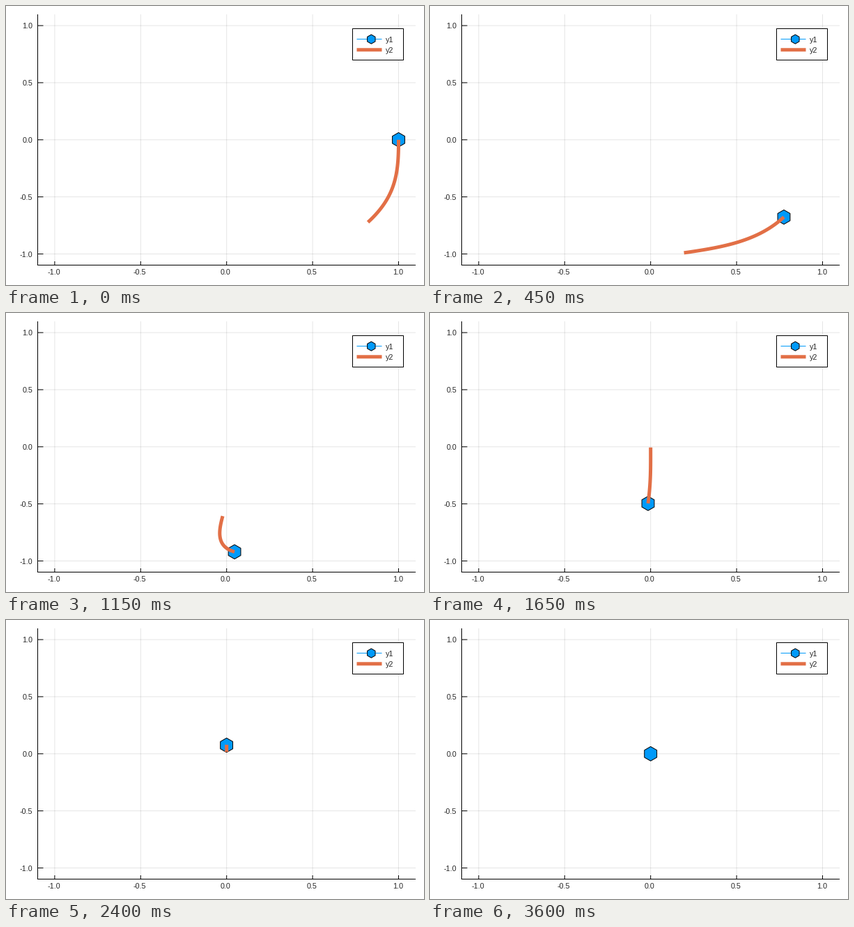
Recreate the animation shown at these times as a matplotlib script. Size 600 by 400 pixels, loop 4 s.

```python
import numpy as np
import matplotlib.pyplot as plt
from matplotlib.animation import FuncAnimation
from matplotlib.patches import Polygon, Rectangle

W, H, DPI = 600, 400, 100
FRAMES, STEP = 80, 50
HORIZON = 9          # steps that the path ahead covers
SETTLE = 50          # step from which the marker decays to rest
REST = 72            # step from which no path is left
BLUE, ORANGE = "#009afa", "#e26f46"
PX = 72 / DPI
TICKS = np.linspace(-1, 1, 5)

# key points: step, x, y
MARKER = [(0, 1, 0), (4, .965, -.33), (9, .775, -.677), (16, .37, -.91),
          (23, .046, -.92), (33, -.015, -.496), (40, -.003, -.111),
          (SETTLE, 0, .114)]
AHEAD = [(0, .822, -.722), (9, .194, -.99), (12, -.01, -.985),
         (16, -.055, -.86), (23, -.023, -.607), (33, 0, -.006),
         (40, .001, .08), (SETTLE, 0, 0)]
# step, direction of travel in degrees
HEADING = [(0, -90), (9, -126), (18, -168), (23, -203), (32, -280), (34, -270)]


def to_px(x, y):
    return 316.7 + 246.8 * x, 191.8 - 163.7 * y


def spline(keys, k):
    """Cubic Hermite curve through the keys."""
    keys = np.array(keys, float)
    t, p = keys[:, 0], keys[:, 1:]
    m = np.gradient(p, t, axis=0)
    i = min(np.searchsorted(t, k, side="right"), len(t) - 1) - 1
    h = t[i + 1] - t[i]
    s = (k - t[i]) / h
    return ((1 + 2 * s) * (1 - s) ** 2 * p[i] + s * (1 - s) ** 2 * h * m[i]
            + s * s * (3 - 2 * s) * p[i + 1] + s * s * (s - 1) * h * m[i + 1])


def heading(k):
    a = np.radians(np.interp(k, *zip(*HEADING)))
    return np.array([np.cos(a), np.sin(a)])


def path_ahead(k):
    """Curve that leaves the marker and ends along the later heading."""
    start, end = spline(MARKER, min(k, SETTLE)), spline(AHEAD, min(k, SETTLE))
    start = start * 0.7 ** max(0, k - SETTLE)
    reach = 0.38 * np.hypot(*(end - start))
    a = start + reach * heading(k)
    b = end - reach * heading(k + HORIZON)
    s = np.linspace(0, 1, 40)[:, None]
    return ((1 - s) ** 3 * start + 3 * s * (1 - s) ** 2 * a
            + 3 * s * s * (1 - s) * b + s ** 3 * end)


def hexagon(x, y, r):
    a = np.radians(np.arange(30, 390, 60))
    return np.column_stack([x + r * np.cos(a), y + r * np.sin(a)])


fig = plt.figure(figsize=(W / DPI, H / DPI), dpi=DPI, facecolor="white")
ax = fig.add_axes([0, 0, 1, 1])
ax.set_xlim(0, W)
ax.set_ylim(H, 0)
ax.axis("off")


def line(xs, ys, color="black", width=1, **kw):
    return ax.plot(xs, ys, color=color, lw=width * PX, snap=False,
                   solid_capstyle="butt", **kw)[0]


def label(x, y, text, ha):
    ax.text(x, y, text, ha=ha, va="baseline", fontsize=10.8 * PX,
            family="Liberation Sans", color="#262626", zorder=6)


def marker(x, y, r, z):
    return ax.add_patch(Polygon(hexagon(x, y, r), closed=True, fc=BLUE,
                                ec="black", lw=PX, zorder=z, snap=False))


for v in TICKS:
    x, y = to_px(v, v)
    line([x, x], [12, 371.5], alpha=0.1, zorder=1)
    line([45.5, 588], [y, y], alpha=0.1, zorder=1)
    line([x, x], [366, 371.5], zorder=2)
    line([45.5, 53.5], [y, y], zorder=2)
    label(x - 1.2, 385, f"{v:.1f}", "center")
    label(38, y + 4, f"{v:.1f}", "right")
line([45.5, 45.5], [12, 372], zorder=2)
line([45, 588], [371.5, 371.5], zorder=2)

ax.add_patch(Rectangle((497.5, 32.5), 73, 45, fc="white", ec="black",
                       lw=PX, zorder=5, snap=False))
line([503.5, 539.5], [47.5, 47.5], BLUE, 1, zorder=6)
marker(524.3, 47.6, 6.6, 7)
line([503.5, 539.5], [62.8, 62.8], ORANGE, 5, zorder=6)
label(545, 51.8, "y1", "left")
label(545, 66.8, "y2", "left")

ball = marker(0, 0, 10.3, 3)
trail = line([], [], ORANGE, 5, zorder=4, solid_joinstyle="bevel")


def update(k):
    path = path_ahead(k)
    ball.set_xy(hexagon(*to_px(*path[0]), 10.3))
    trail.set_data(*to_px(path[:, 0], path[:, 1]))
    trail.set_visible(k < REST)
    return ball, trail


anim = FuncAnimation(fig, update, frames=FRAMES, interval=STEP,
                     init_func=lambda: update(0), repeat=True, repeat_delay=0)
plt.show()
```
